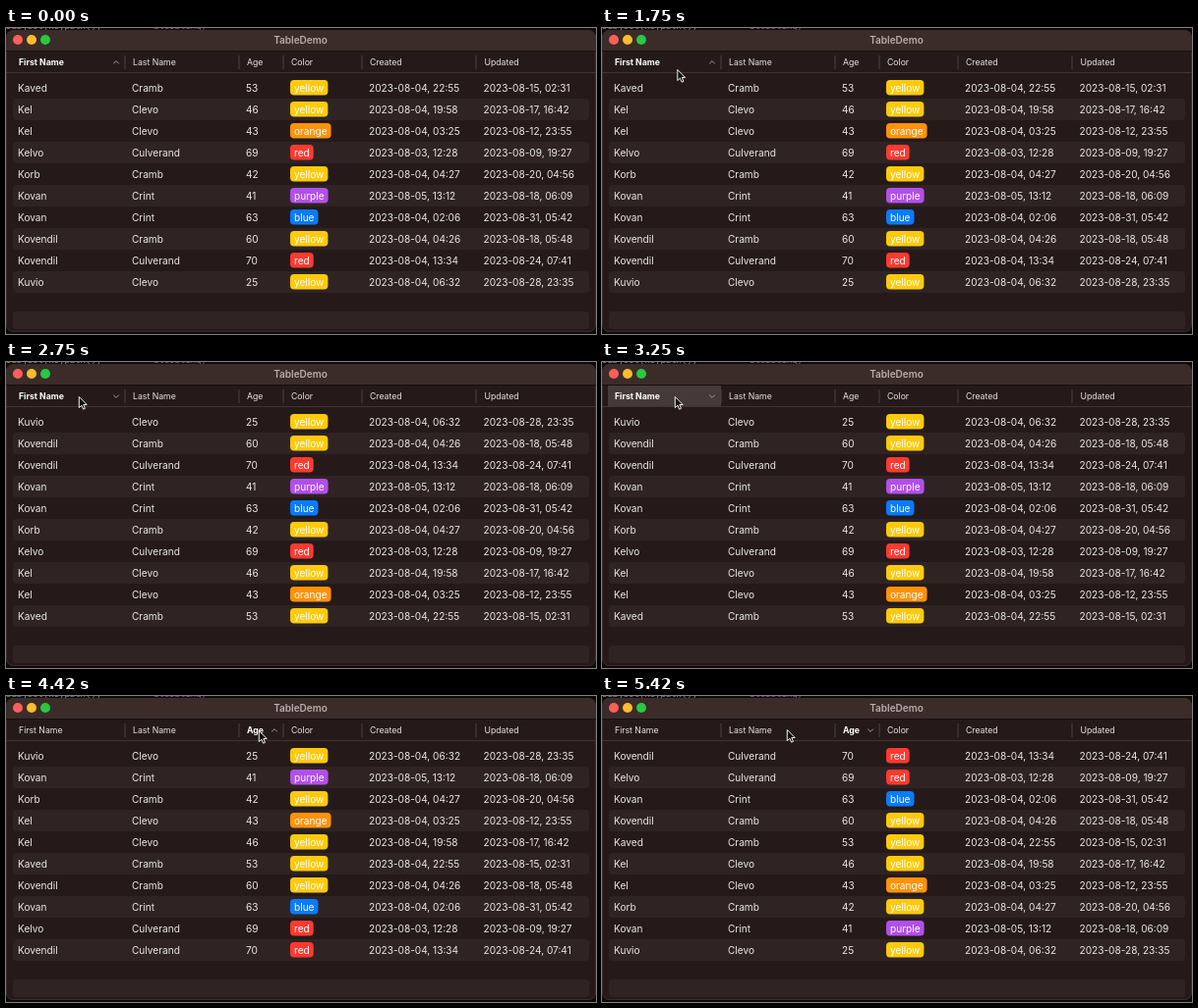
These frames come from a looping animation (600 px wide and 312 px high, 5510 ms). An HTML page with a canvas:

```html
<!DOCTYPE html>
<html lang="en">
<head>
<meta charset="utf-8">
<title>TableDemo</title>
<style>
  html, body { margin: 0; width: 600px; height: 312px; overflow: hidden; background: #0e0a0b; }
  canvas { display: block; }
</style>
</head>
<body>
<canvas id="stage" width="600" height="312"></canvas>
<script>
const ctx = document.getElementById('stage').getContext('2d');
const LOOP = 5510, FRAME = 1000 / 12, LAST = 65;
const SANS = 'Inter, "Open Sans", sans-serif';

const COLUMNS = [
  { title: 'First Name', x: 12, left: 6, right: 121 },
  { title: 'Last Name', x: 128, left: 121, right: 237 },
  { title: 'Age', x: 244, left: 237, right: 282 },
  { title: 'Color', x: 289, left: 282, right: 362 },
  { title: 'Created', x: 369, left: 362, right: 478 },
  { title: 'Updated', x: 485.5, left: 478, right: 594 }
];
const PILLS = { yellow: '#ffca0c', orange: '#ff9208', red: '#ff3a30', purple: '#b150e8', blue: '#0a7aff' };

const PEOPLE = [
  ['Kaved', 'Cramb', 53, 'yellow', '2023-08-04, 22:55', '2023-08-15, 02:31'],
  ['Kel', 'Clevo', 46, 'yellow', '2023-08-04, 19:58', '2023-08-17, 16:42'],
  ['Kel', 'Clevo', 43, 'orange', '2023-08-04, 03:25', '2023-08-12, 23:55'],
  ['Kelvo', 'Culverand', 69, 'red', '2023-08-03, 12:28', '2023-08-09, 19:27'],
  ['Korb', 'Cramb', 42, 'yellow', '2023-08-04, 04:27', '2023-08-20, 04:56'],
  ['Kovan', 'Crint', 41, 'purple', '2023-08-05, 13:12', '2023-08-18, 06:09'],
  ['Kovan', 'Crint', 63, 'blue', '2023-08-04, 02:06', '2023-08-31, 05:42'],
  ['Kovendil', 'Cramb', 60, 'yellow', '2023-08-04, 04:26', '2023-08-18, 05:48'],
  ['Kovendil', 'Culverand', 70, 'red', '2023-08-04, 13:34', '2023-08-24, 07:41'],
  ['Kuvio', 'Clevo', 25, 'yellow', '2023-08-04, 06:32', '2023-08-28, 23:35']
];

// Clicks on headers: frame of release, column, direction
const SORTS = [[0, 0, 1], [29, 0, -1], [40, 0, 1], [51, 2, 1], [60, 2, -1]];
// Pointer path: frame, x, y
const PATH = [
  [8, 150, -16], [13, 89, 77], [16, 89, 77], [22, 74, 35], [41, 74, 35],
  [44, 162, 38], [48, 257, 35], [62, 257, 35], [65, 188, 34]
];

const sortAt = frame => SORTS.filter(s => s[0] <= frame).pop() || SORTS[0];

function sortedRows([, col, dir]) {
  return [...PEOPLE].sort((a, b) => dir * ((a[col] > b[col]) - (a[col] < b[col])));
}

function box(x, y, w, h, r, fill) {
  ctx.fillStyle = fill;
  ctx.beginPath();
  ctx.roundRect(x, y, w, h, r);
  ctx.fill();
}

function text(str, x, y, size, fill, weight = 400, align = 'left') {
  ctx.font = `${weight} ${size}px ${SANS}`;
  ctx.textAlign = align;
  ctx.fillStyle = fill;
  ctx.fillText(str, x, y);
}

function drawWindow() {
  box(0, 0, 600, 312, 0, '#0e0a0b');
  ctx.font = '9px "Noto Sans Mono", monospace';
  ctx.textAlign = 'left';
  ctx.fillStyle = '#8f8a92';
  ctx.fillText('subject(keypath(), ', 0, 1);
  ctx.fillStyle = '#8a5a80';
  ctx.fillText('iterating)', 150, 1);

  box(0, 2, 600, 308, 8, '#4b403f');
  box(0.5, 2.5, 599, 307, 7.5, '#251a19');
  box(0.5, 2.5, 599, 20.5, [7.5, 7.5, 0, 0], '#3b2c2a');
  box(0, 23, 600, 1, 0, '#171010');
  ['#ff5f57', '#febc2e', '#28c840'].forEach((c, i) => box(7 + 14 * i, 7, 10, 10, 5, c));
  text('TableDemo', 299.5, 16, 10, '#b9aeac', 600, 'center');
}

function drawHeader(frame) {
  const [, active, dir] = sortAt(frame);
  const press = SORTS.find(s => s[0] > frame && s[0] - frame <= 2);
  if (press) {
    const { left, right } = COLUMNS[press[1]];
    box(left, 24, right - left, 21, 0, '#453a39');
  }
  box(0, 45, 600, 1, 0, '#403534');
  COLUMNS.forEach((c, i) => {
    const on = i === active;
    text(c.title, c.x + 1, 38, 8.7, on ? '#ffffff' : '#e8e2e1', on ? 700 : 400);
    if (i < 5) box(c.right - 0.5, 28, 1, 14, 0, '#4d4241');
  });
  const x = COLUMNS[active].right - 9;
  ctx.strokeStyle = '#a69c9a';
  ctx.lineWidth = 1;
  ctx.beginPath();
  ctx.moveTo(x - 2.8, 35 + 1.4 * dir);
  ctx.lineTo(x, 35 - 1.4 * dir);
  ctx.lineTo(x + 2.8, 35 + 1.4 * dir);
  ctx.stroke();
}

function drawRows(rows) {
  for (let y = 72; y < 270; y += 44) box(7, y, 586, 22, 4, '#2f2423');
  box(7, 289, 586, 18, 4, '#2f2423');
  rows.forEach((row, i) => {
    const y = 61 + 22 * i;
    row.forEach((value, j) => {
      const { x } = COLUMNS[j];
      if (j === 3) {
        ctx.font = `400 10.1px ${SANS}`;
        box(x, y - 8, ctx.measureText(value).width + 8, 15.5, 4, PILLS[value]);
        text(value, x + 4, y + 3.5, 10.1, '#fff');
      } else {
        text(value, x, y + 3.6, 10.1, '#ece7e6');
      }
    });
  });
}

function drawPointer(frame) {
  const k = PATH.findIndex(p => p[0] >= frame);
  if (k < 1) return;
  const [f0, x0, y0] = PATH[k - 1], [f1, x1, y1] = PATH[k];
  const u = (frame - f0) / (f1 - f0);
  ctx.save();
  ctx.translate(x0 + (x1 - x0) * u, y0 + (y1 - y0) * u);
  ctx.fillStyle = '#0c0909';
  ctx.strokeStyle = '#f4f1f0';
  ctx.lineWidth = 1;
  const arrow = new Path2D('M.3 .5V11.6L2.9 9.2 4.6 13.2 6.5 12.4 4.8 8.5H8.2Z');
  ctx.fill(arrow);
  ctx.stroke(arrow);
  ctx.restore();
}

function draw(now) {
  const frame = Math.min(LAST, Math.floor((now % LOOP + 4) / FRAME));
  drawWindow();
  drawHeader(frame);
  drawRows(sortedRows(sortAt(frame - 1))); // rows follow the header one step later
  drawPointer(frame);
}

const start = performance.now();
function tick() {
  draw(performance.now() - start);
  requestAnimationFrame(tick);
}
tick();
</script>
</body>
</html>
```
